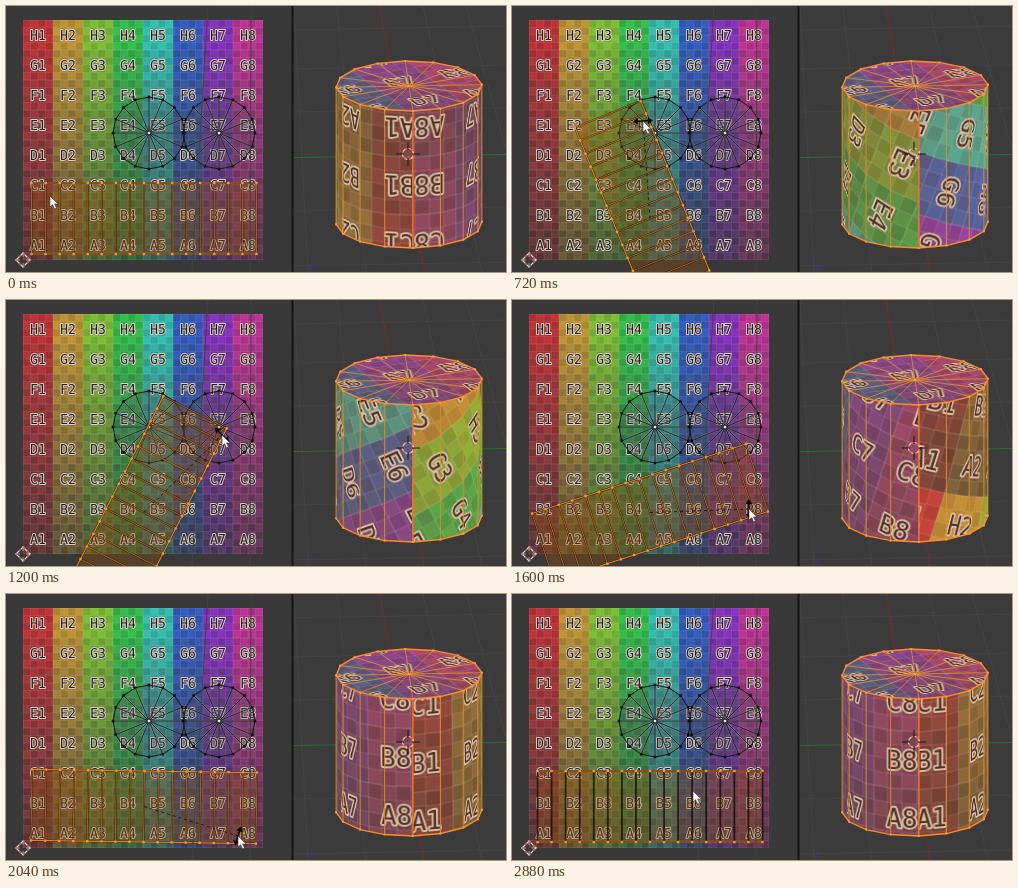
Recreate the animation shown at these times as an HTML page with a canvas. Size 500 by 266 pixels, loop 2.92 s.

```html
<!DOCTYPE html>
<html lang="en">
<head>
<meta charset="utf-8">
<title>Rotating a UV island</title>
<style>
html, body { margin: 0; width: 100%; height: 100%; overflow: hidden; background: #393939; }
canvas { display: block; width: 500px; height: 266px; }
</style>
</head>
<body>
<canvas id="stage" width="500" height="266"></canvas>
<script>
const LOOP = 2920, STEP = 40, CONFIRM = 2480, FINAL = 2880;
const TAU = Math.PI * 2, RAD = Math.PI / 180;
const ctx = document.getElementById('stage').getContext('2d');
ctx.imageSmoothingQuality = 'high';

const MAP = { x: 17, y: 14, size: 240, cell: 30 };
const STRIP = { x: 138, y: 212.5, w: 225, h: 71 };
const DISCS = [[143, 127], [213, 127]];
const DISC_R = 36, SIDES = 16;
const CYL = { x: 403, y: 80, rx: 73, ry: 25, h: 137, seam: 3 };

// time, value...
const TURN = [[0, 0], [40, 0], [360, 31], [720, 68], [1200, 117], [1600, 162],
  [1880, 180], [2040, 180.8], [2480, 180], [2920, 180]];
const MOUSE = [[0, 44, 190], [40, 44, 190], [360, 66, 132], [720, 131, 115], [1200, 216, 135],
  [1600, 237, 209], [1880, 233, 239], [2040, 232, 242], [2480, 228, 239], [2840, 181, 197], [2920, 181, 197]];

// Monotone cubic through the keys
function sample(keys, t, c = 1) {
  let i = 0;
  while (i < keys.length - 2 && t >= keys[i + 1][0]) i++;
  const rate = n => (keys[n + 1][c] - keys[n][c]) / (keys[n + 1][0] - keys[n][0]);
  const tangent = n => {
    if (n < 1 || n > keys.length - 2) return 0;
    const a = rate(n - 1), b = rate(n);
    return a * b <= 0 ? 0 : 2 * a * b / (a + b);
  };
  const a = keys[i], b = keys[i + 1], d = b[0] - a[0], s = (t - a[0]) / d;
  const s2 = s * s, s3 = s2 * s;
  return a[c] * (2 * s3 - 3 * s2 + 1) + b[c] * (3 * s2 - 2 * s3)
    + d * (tangent(i) * (s3 - 2 * s2 + s) + tangent(i + 1) * (s3 - s2));
}

function line(g, pts, color, width = 1, close = false) {
  g.beginPath();
  pts.forEach(p => g.lineTo(p[0], p[1]));
  if (close) g.closePath();
  g.strokeStyle = color;
  g.lineWidth = width;
  g.stroke();
}

function dot(x, y, size, color) {
  ctx.fillStyle = color;
  ctx.fillRect(x - size / 2, y - size / 2, size, size);
}

function makeTexture() {
  const cv = document.createElement('canvas');
  cv.width = cv.height = MAP.size * 2;
  const g = cv.getContext('2d');
  g.scale(2, 2);
  const hues = [358, 42, 88, 130, 174, 222, 275, 318];
  const sub = MAP.cell / 4;
  for (let r = 0; r < 32; r++) {
    for (let c = 0; c < 32; c++) {
      const row = Math.floor(r / 4), col = Math.floor(c / 4);
      const light = 45 - row * 2.2 + ((r + c) % 2 ? 2.4 : -2.4);
      g.fillStyle = `hsl(${hues[col]} ${57 - row * 4}% ${light}%)`;
      g.fillRect(c * sub, r * sub, sub, sub);
    }
  }
  for (let i = 0; i <= 32; i++) {
    g.fillStyle = `rgba(255,255,255,${i % 4 ? 0.15 : 0.24})`;
    g.fillRect(i * sub - 0.25, 0, 0.5, MAP.size);
    g.fillRect(0, i * sub - 0.25, MAP.size, 0.5);
  }
  g.font = '13px "DejaVu Sans Mono", monospace';
  g.textAlign = 'center';
  g.lineJoin = 'round';
  for (let r = 0; r < 8; r++) {
    for (let c = 0; c < 8; c++) {
      const label = 'HGFEDCBA'[r] + (c + 1);
      const x = c * MAP.cell + 15, y = r * MAP.cell + 20.2;
      g.strokeStyle = '#ddd2c4';
      g.lineWidth = 1.9;
      g.strokeText(label, x, y);
      g.fillStyle = '#241e20';
      g.fillText(label, x, y);
    }
  }
  return cv;
}

const texture = makeTexture();
const pattern = ctx.createPattern(texture, 'repeat');

// Fills a polygon with the texture; both bases are matrices of the same unit frame
function fillMapped(pts, screen, uv) {
  ctx.save();
  ctx.beginPath();
  pts.forEach(p => ctx.lineTo(p[0], p[1]));
  ctx.closePath();
  const m = screen.multiply(uv.inverse()).translate(MAP.x, MAP.y).scale(0.5);
  ctx.transform(m.a, m.b, m.c, m.d, m.e, m.f);
  ctx.fillStyle = pattern;
  ctx.fill();
  ctx.restore();
  ctx.fillStyle = 'rgba(215,125,60,.22)';
  ctx.fill();
}

function crosshair(x, y, arm, inner, color) {
  for (const [dx, dy] of [[1, 0], [-1, 0], [0, 1], [0, -1]])
    line(ctx, [[x + dx * inner, y + dy * inner], [x + dx * arm, y + dy * arm]], color);
}

// Closed outline in alternating red and white dashes
function candy(path) {
  ctx.save();
  ctx.lineWidth = 1.2;
  ctx.strokeStyle = '#e8e2e0';
  ctx.stroke(path);
  ctx.setLineDash([2.8, 2.8]);
  ctx.strokeStyle = '#d84a42';
  ctx.stroke(path);
  ctx.restore();
}

function cursor3d(x, y) {
  const ring = new Path2D();
  ring.arc(x, y, 5.5, 0, TAU);
  candy(ring);
  crosshair(x, y, 12, 4, '#151515');
}

function cursor2d(x, y) {
  candy(new Path2D(`M${x} ${y - 7}l7 7l-7 7l-7 -7z`));
  crosshair(x, y, 8, 3, 'rgba(190,190,190,.75)');
}

function drawDisc([x, y]) {
  const rim = [];
  for (let i = 0; i < SIDES; i++) {
    const a = i * TAU / SIDES;
    rim.push([x + DISC_R * Math.cos(a), y + DISC_R * Math.sin(a)]);
  }
  ctx.beginPath();
  rim.forEach(p => ctx.lineTo(p[0], p[1]));
  ctx.fillStyle = 'rgba(75,80,90,.22)';
  ctx.fill();
  rim.forEach(p => line(ctx, [[x, y], p], 'rgba(210,210,210,.16)', 2.2));
  line(ctx, rim, '#181818', 1, true);
  rim.forEach(p => line(ctx, [[x, y], p], 'rgba(15,15,15,.85)', 0.9));
  rim.forEach(p => dot(p[0], p[1], 2.6, '#0c0c0c'));
  dot(x, y, 4.4, '#111');
  dot(x, y, 2.6, '#e8e8e8');
}

function drawStrip(turn, dark) {
  const w = STRIP.w / 2, h = STRIP.h / 2;
  ctx.save();
  ctx.translate(STRIP.x, STRIP.y);
  ctx.rotate(turn * RAD);
  ctx.fillStyle = 'rgba(150,82,14,.33)';
  ctx.fillRect(-w, -h, STRIP.w, STRIP.h);
  for (let i = 0; i <= SIDES; i++) {
    const x = -w + i * STRIP.w / SIDES;
    line(ctx, [[x, -h], [x, h]], 'rgba(20,14,8,.8)', 1.8);
    if (!dark) line(ctx, [[x, -h], [x, h]], 'rgba(215,122,28,.85)', 0.9);
  }
  for (const y of [-h, h]) {
    line(ctx, [[-w, y], [w, y]], '#2a1a0a', 2);
    line(ctx, [[-w, y], [w, y]], '#e08524', 1.2);
    for (let i = 0; i <= SIDES; i++) dot(-w + i * STRIP.w / SIDES, y, 2.4, '#f39a35');
  }
  ctx.restore();
}

function drawPointer(x, y, active) {
  if (active) {
    ctx.save();
    ctx.setLineDash([3, 3]);
    line(ctx, [[STRIP.x, STRIP.y], [x, y]], 'rgba(10,10,10,.8)');
    ctx.restore();
    ctx.save();
    ctx.translate(x, y);
    ctx.rotate(Math.atan2(y - STRIP.y, x - STRIP.x));
    line(ctx, [[0, -7], [0, 7]], '#080808', 1.6);
    ctx.fillStyle = '#080808';
    for (const s of [-1, 1]) {
      ctx.beginPath();
      ctx.moveTo(0, s * 10);
      ctx.lineTo(-3.5, s * 5);
      ctx.lineTo(3.5, s * 5);
      ctx.fill();
    }
    ctx.restore();
  }
  ctx.beginPath();
  for (const [dx, dy] of [[0, 0], [0, 11], [2.6, 8.7], [4.6, 13], [6.5, 12.1], [4.6, 8], [8, 8]])
    ctx.lineTo(x + dx, y + dy);
  ctx.closePath();
  ctx.fillStyle = '#fff';
  ctx.fill();
  ctx.strokeStyle = '#333';
  ctx.lineWidth = 0.6;
  ctx.stroke();
}

function drawEditor(t, turn) {
  ctx.save();
  ctx.beginPath();
  ctx.rect(0, 0, 286, 266);
  ctx.clip();
  ctx.fillStyle = '#393939';
  ctx.fillRect(0, 0, 286, 266);
  ctx.drawImage(texture, MAP.x, MAP.y, MAP.size, MAP.size);
  DISCS.forEach(drawDisc);
  drawStrip(turn, t >= FINAL);
  cursor2d(MAP.x, MAP.y + MAP.size);
  drawPointer(sample(MOUSE, t, 1), sample(MOUSE, t, 2), t >= STEP && t < CONFIRM);
  ctx.restore();
}

function drawFloor() {
  ctx.fillStyle = '#3b3b3b';
  ctx.fillRect(286, 0, 214, 266);
  for (let i = -4; i <= 4; i++) {
    if (i) line(ctx, [[374 + i * 43, 0], [418 + i * 58, 266]], '#444');
  }
  for (const y of [22, 61, 104, 203, 258]) line(ctx, [[286, y + 2], [500, y - 2]], '#444');
  line(ctx, [[374, 0], [418, 266]], '#7d2a2e');
  line(ctx, [[286, 151.5], [500, 148.5]], '#2b6f33');
  ctx.font = 'italic 8px "DejaVu Sans", sans-serif';
  ctx.fillStyle = '#3636a8';
  ctx.textAlign = 'center';
  ctx.fillText('z', 305, 263);
}

function rimPoint(k, drop = 0) {
  const a = (CYL.seam + k * 360 / SIDES) * RAD;
  return [CYL.x + CYL.rx * Math.sin(a), CYL.y + CYL.ry * Math.cos(a) + drop];
}

function drawCylinder(turn) {
  const edge = 'rgba(232,147,37,.88)', bright = '#ff8a2a';
  const step = STRIP.w / SIDES;
  for (let k = -4; k < 4; k++) {
    const a = rimPoint(k), b = rimPoint(k + 1);
    const c = rimPoint(k + 1, CYL.h), d = rimPoint(k, CYL.h);
    const u = STRIP.w / 2 - k * step - (k < 0 ? STRIP.w : 0);
    const screen = new DOMMatrix([b[0] - a[0], b[1] - a[1], 0, CYL.h, a[0], a[1]]);
    const uv = new DOMMatrix().translate(STRIP.x, STRIP.y).rotate(turn)
      .multiply(new DOMMatrix([-step, 0, 0, -STRIP.h, u, STRIP.h / 2]));
    fillMapped([a, b, c, d], screen, uv);
  }
  const rim = Array.from({ length: SIDES }, (_, k) => rimPoint(k));
  const capUv = new DOMMatrix().translate(...DISCS[1]).rotate(25).scale(DISC_R);
  fillMapped(rim, new DOMMatrix([CYL.rx, 0, 0, CYL.ry, CYL.x, CYL.y]), capUv);

  rim.forEach(p => line(ctx, [[CYL.x, CYL.y], p], edge, 0.9));
  for (let k = -4; k <= 4; k++) line(ctx, [rimPoint(k), rimPoint(k, CYL.h)], edge);
  line(ctx, [rimPoint(0), rimPoint(0, CYL.h)], '#f46a22', 1.4);
  const base = [];
  for (let k = -4; k <= 4; k++) base.push(rimPoint(k, CYL.h));
  line(ctx, base, bright, 1.4);
  line(ctx, rim, bright, 1.4, true);
  [...rim, ...base, [CYL.x, CYL.y]].forEach(p => dot(p[0], p[1], 2, '#ff9c3c'));
  cursor3d(402, 148);
}

function draw(t) {
  const turn = sample(TURN, t);
  drawEditor(t, turn);
  drawFloor();
  drawCylinder(turn);
  ctx.fillStyle = '#151515';
  ctx.fillRect(285.5, 0, 2, 266);
}

const start = performance.now();
function tick() {
  const t = (performance.now() - start) % LOOP;
  draw(Math.floor(t / STEP) * STEP);
  requestAnimationFrame(tick);
}
tick();
</script>
</body>
</html>
```
